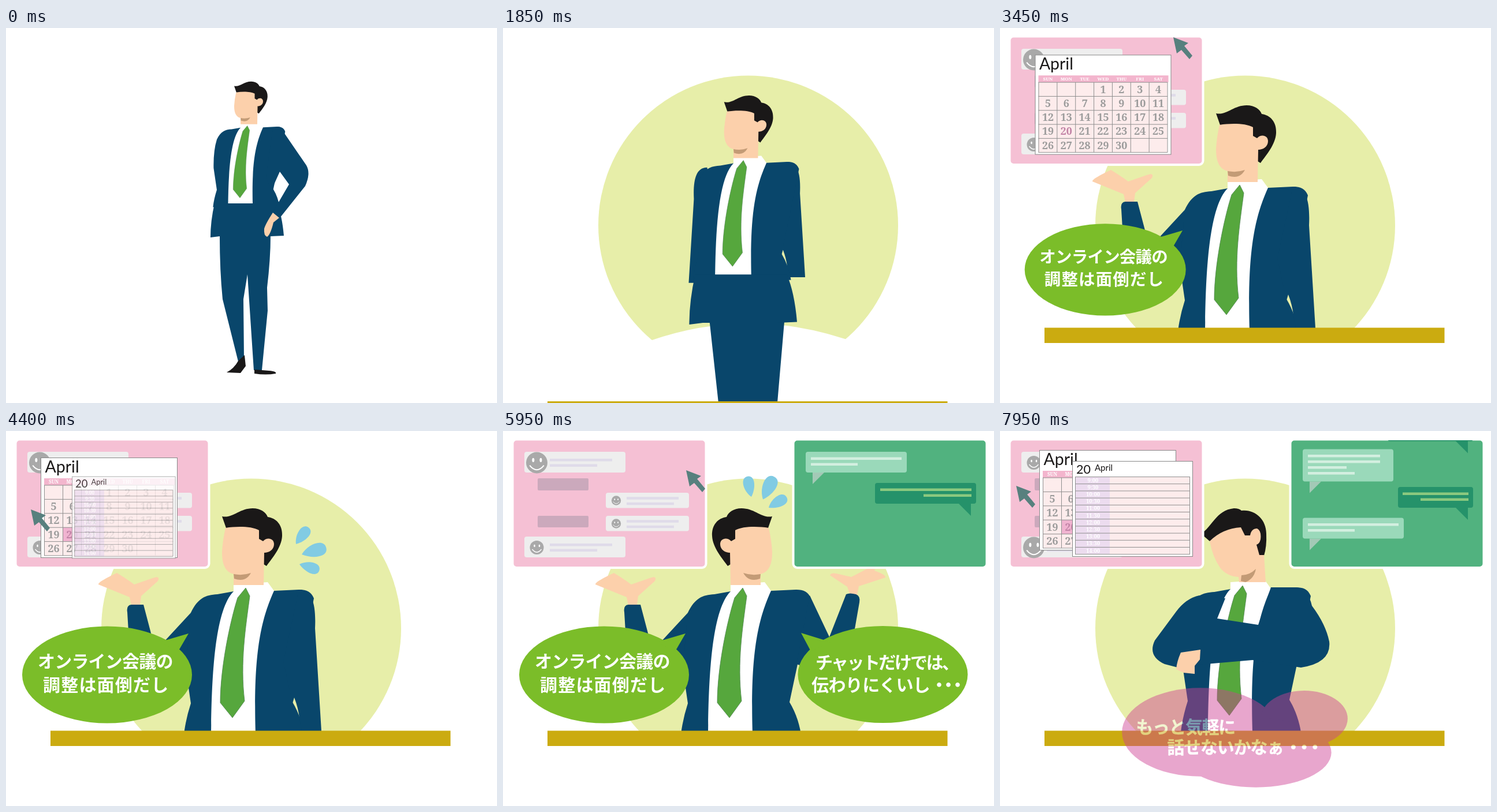
Animation of 850x650 px, one loop 8 s. Source, as an HTML page:

```html
<!DOCTYPE html>
<html lang="ja">
<head>
<meta charset="utf-8">
<style>
  html, body { margin: 0; height: 100%; overflow: hidden; background: #fff; }
  svg { display: block; font-family: "Noto Sans CJK JP", "Noto Sans CJK", sans-serif; }
  .navy { fill: #09466b; } .skin { fill: #fcd0ab; } .hair { fill: #1a1818; }
  .shade { fill: #c39b76; } .white, .talk { fill: #fff; }
  .talk { font-size: 30px; font-weight: 700; }
  .shout { font-size: 42px; font-weight: 900; fill: #fff; stroke: #fff; stroke-width: 1.2; }
  .wish { font-size: 38px; stroke-width: .5; }
  .pink { fill: #cf4093; } .lime { fill: #7bbd29; }
  .latin { font-family: Lato, sans-serif; }
  .num { font-family: "Noto Serif", serif; font-weight: 700; text-anchor: middle; }
</style>
</head>
<body>
<svg width="850" height="650" viewBox="0 0 850 650">
  <defs>
    <clipPath id="chatClip"><rect x="504" y="16" width="332" height="219"/></clipPath>
    <g id="headA">
      <path class="hair" d="M374 148C392 152 404 134 427 134C441 134 450 141 453 149C468 151 479 163 478 182C477 202 461 220 451 234L446 231 430 200V170L381 168Z"/>
      <path class="skin" d="M380 168C400 165 425 165 438 172V187L445 191C452 183 464 186 464 196C464 206 455 211 447 211L446 267H394V248C378 244 374 228 374 210Q375 190 380 168Z"/>
      <path class="shade" d="M394 248Q410 251 424 246Q415 263 395 256Z"/>
    </g>
    <g id="headB">
      <path class="hair" d="M348 178C366 168 374 137 405 134Q414 134 418 138C440 135 461 152 461 178Q462 200 457 216L446 215 430 195 410 185 400 170 363 191Z"/>
      <path class="skin" d="M363 191Q385 169 417 167L424 181H433Q435 169 445 169Q453 173 451 188Q449 196 444 197L449 215H457L460 262H414L413 253Q393 252 381 237Q368 218 363 191Z"/>
      <path class="shade" d="M418 250Q432 250 443 239Q440 256 425 262L417 260Z"/>
    </g>
    <g id="torso">
      <path class="navy" d="M394 278L366 283C345 284 332 290 320 315Q309 350 310 404L320 472Q311 500 308 526H516Q511 495 496 470L510 404 533 290C528 278 520 275 507 275L464 277Z"/>
      <path class="white" d="M394 266L453 262 464 277C440 330 428 390 432 526H355C356 420 362 310 394 278Z"/>
      <path d="M415 272L422 286C415 340 405 400 413 468L392 497 371 471C371 410 388 330 401 289Z" fill="#56a73d" stroke="#4d8350" stroke-width=".8"/>
    </g>
    <path id="hem" class="navy" d="M361 304Q354 335 354 363L370 361H458L481 360Q478 325 469 304Z"/>
    <g id="legs">
      <path class="navy" d="M378 360L403 590H417L422 480 431 593H446L466 360Z"/>
      <path class="hair" d="M380 597Q385 590 417 589V597Q400 599 380 597ZM432 592L455 594Q471 595 470 599Q450 602 432 599Z"/>
    </g>
    <path id="armDown" class="navy" d="M507 275C530 275 537 300 535 342L546 520H512L508 498Q506 480 499 462L496 472 480 400Z"/>
    <g id="armUp">
      <path class="skin" d="M217 302L214 288 160 266Q158 262 192 246Q210 257 222 266L257 254Q267 251 263 260L234 286 232 302Z"/>
      <path class="navy" d="M320 315L259 381 238 301H217Q208 302 210 314L215 398C217 425 228 436 247 430L312 403Z"/>
    </g>
    <path id="drop" fill="#81cbe3" d="M0 0C-12 -12 -14 -36 0 -36C14 -36 11 -14 0 0Z"/>
    <g id="drops">
      <use href="#drop" transform="translate(502 196) rotate(37)"/>
      <use href="#drop" transform="translate(512 214) rotate(74) scale(1.22)"/>
      <use href="#drop" transform="translate(508 231) rotate(107)"/>
    </g>
    <g id="cloudShape" class="pink">
      <ellipse cx="345" cy="361" rx="173" ry="98"/><ellipse cx="575" cy="331" rx="96" ry="62"/>
      <ellipse cx="468" cy="406" rx="167" ry="77"/>
    </g>
  </defs>

  <circle id="disc" cx="424.5" cy="342" r="259.5" fill="#e7eea9"/>
  <path id="ground" class="white"/>

  <g id="man">
    <g id="idle">
      <use href="#torso"/>
      <g transform="translate(-337 -33) scale(1.8)">
        <use href="#hem"/>
        <path class="navy" d="M370 360Q370 420 375 470L402 578 412 570 411 470 418 427 429 593H443L453 490 452 450Q458 400 458 360Z"/>
        <path class="hair" d="M413 567L402 577Q395 590 382 597L406 598 415 586ZM430 592L455 594Q469 595 467 599Q450 602 430 599Z"/>
        <path class="navy" d="M462 174Q478 173 483 184L520 238Q528 252 518 274L475 328 462 319 490 271 474 249 460 280 450 260Z"/>
        <path class="skin" d="M462 320L473 329 463 337Q458 358 452 362Q446 360 447 348Q449 340 462 320Z"/>
      </g>
      <use href="#headA"/>
    </g>
    <g id="puzzled">
      <use href="#torso" x="5"/>
      <g transform="translate(-337 -33) scale(1.8)">
        <use href="#legs"/><use href="#hem"/>
        <path class="navy" d="M384 179Q370 180 338 225Q329 237 331 247L335 266H355L358 250 362 245 367 285 384 250Z"/>
        <path class="navy" d="M445 174H470L497 147 459 132V118L488 120Q520 124 526 140Q529 150 520 162L486 212 464 278 450 250Z"/>
        <path class="skin" d="M459 119L438 112 434 130 459 131Z"/>
      </g>
      <use href="#headB" y="-4"/>
    </g>
    <g id="rest">
      <use href="#armDown"/><use href="#armDown" transform="translate(845 12) scale(-1 1)"/>
      <use href="#torso"/>
      <g transform="translate(-337 -33) scale(1.8)"><use href="#legs"/><use href="#hem"/></g>
      <use href="#headA"/>
    </g>
    <g id="oneUp"><use href="#torso"/><use href="#armDown"/><use href="#armUp"/><use href="#headA"/></g>
    <g id="bothUp">
      <use href="#torso"/><use href="#armUp"/>
      <path class="skin" d="M601 284L596 270 566 250Q568 245 577 247L603 253 632 238Q640 235 645 237L643 242Q663 249 662 254L616 269 613 284Z"/>
      <path class="navy" d="M531 285L565 357 594 283Q600 280 611 283Q619 286 617 297L606 360C602 410 596 432 575 428L508 404Z"/>
      <use href="#headA" transform="translate(840 0) scale(-1 1)"/>
    </g>
    <g id="folded">
      <use href="#torso" x="5" y="-4"/>
      <path class="navy" d="M345 285Q322 290 305 313L268 363Q255 390 285 404L308 410 345 405 437 397 521 410Q574 402 570 365Q564 335 540 303Q533 272 512 271H469L447 336 376 325 390 290Z"/>
      <path class="skin" d="M313 384L347 379 346 396 337 407V421L318 419 305 413Q306 400 313 384Z"/>
      <use href="#headB"/>
    </g>
  </g>

  <g id="desk">
    <rect y="546" width="850" height="260" class="white"/>
    <rect x="77" y="519.5" width="692.5" height="26.5" fill="#cbab10"/>
  </g>

  <g id="pinkPanel">
    <rect x="16.5" y="14.5" width="335" height="222.5" rx="7" fill="#f5c0d4" stroke="#fff" stroke-width="4"/>
    <g id="notes"></g><g id="month"></g><g id="day"></g>
    <path id="cursor" fill="#57807e" d="M0 0L26 10 19 15 33 32 28 38 14 22 6 28Z"/>
  </g>
  <g id="greenPanel">
    <rect x="502.5" y="14.5" width="335" height="222.5" rx="7" fill="#51b27f" stroke="#fff" stroke-width="4"/>
    <g clip-path="url(#chatClip)"><g id="chat"></g></g>
  </g>

  <use id="sweatRight" href="#drops"/>
  <use id="sweatTop" href="#drops" transform="translate(430 114) rotate(-48) translate(-502 -196)"/>

  <g id="talkLeft">
    <ellipse class="lime" cx="175" cy="422.5" rx="147" ry="84"/>
    <path class="lime" d="M316 351L265 366 298 382Z"/>
    <text class="talk" x="55" y="410" letter-spacing="-.8">オンライン会議の</text>
    <text class="talk" x="64" y="451" letter-spacing="1.2">調整は面倒だし</text>
  </g>
  <g id="talkRight">
    <ellipse class="lime" cx="657.5" cy="422" rx="147" ry="84"/>
    <path class="lime" d="M516 350L568 366 533 382Z"/>
    <text class="talk" x="541" y="412" letter-spacing="-2.6">チャットだけでは、</text>
    <text class="talk" x="534" y="451" letter-spacing="-.6">伝わりにくいし<tspan x="740" letter-spacing="-14">・・・</tspan></text>
  </g>

  <ellipse id="puff1" class="pink" cx="458.5" cy="215" rx="18" ry="12"/>
  <ellipse id="puff2" class="pink" cx="493" cy="254" rx="30" ry="21"/>
  <g id="cloud">
    <use href="#cloudShape"/>
    <text class="shout" x="200" y="354" letter-spacing="-3.5">いきなりテレワークって</text>
    <text class="shout" x="235" y="418" letter-spacing="-1.5">言われてもなぁ<tspan x="508" letter-spacing="-15">・・・</tspan></text>
  </g>
  <path id="swirl" fill="none" stroke="#0b2742" stroke-width="1.3" d="M391 39C386 30 400 26 412 28C432 31 441 41 433 46C420 52 398 50 395 46C396 40 436 42 440 50C442 62 406 66 405 59C406 52 428 52 431 57C432 66 415 66 414 78"/>
  <g id="wish">
    <use href="#cloudShape"/>
    <text class="shout wish" x="203" y="364" letter-spacing="-1.5">もっと気軽に</text>
    <text class="shout wish" x="272" y="408" letter-spacing="-1.2">話せないかなぁ<tspan x="532" letter-spacing="-14">・・・</tspan></text>
  </g>
</svg>

<script>
const LOOP = 8000;
const $ = id => document.getElementById(id);
const range = n => [...Array(n).keys()];
const ramp = (t, a, b) => Math.min(1, Math.max(0, (t - a) / (b - a)));
const lerp = (a, b, u) => a + (b - a) * u;
const smooth = u => u * u * (3 - 2 * u);
const back = (u, s = 1.35) => u <= 0 ? 0 : 1 + (s + 1) * (u - 1) ** 3 + s * (u - 1) ** 2;
const pop = (t, start, s) => back(ramp(t, start, start + 240), s);
const shrink = (t, start, s) => back(1 - ramp(t, start, start + 240), s);

const rect = (x, y, w, h, fill, extra = '') =>
  `<rect x="${x}" y="${y}" width="${w}" height="${h}" fill="${fill}" ${extra}/>`;
const text = (x, y, size, cls, fill, s) =>
  `<text class="${cls}" x="${x}" y="${y}" font-size="${size}" fill="${fill}">${s}</text>`;
const line = (x1, y1, x2, y2) => `<path d="M${x1} ${y1}L${x2} ${y2}" stroke="#8f8f8f"/>`;

function show(el, on) { el.style.display = on ? '' : 'none'; }
function scaleAt(el, s, x, y, dx = 0, dy = 0) {
  show(el, s > 0.001);
  el.setAttribute('transform', `translate(${x + dx} ${y + dy}) scale(${s}) translate(${-x} ${-y})`);
}

// Left panel: contact cards, month sheet and day sheet
const face = (x, y, k, id = '') => `<g transform="translate(${x} ${y}) scale(${k})"><g id="${id}">
  <circle r="12" fill="#a9a9a9"/><ellipse cx="-4" cy="-3" rx="1.3" ry="2.3" fill="#fff"/>
  <ellipse cx="4.5" cy="-3" rx="1.3" ry="2.3" fill="#fff"/>
  <path d="M-8 3Q0 13 8 3" fill="none" stroke="#fff" stroke-width="1.3"/></g></g>`;
const card = (x, y, w, h, lineX, lineW, avatar) => rect(x, y, w, h, '#eee', 'rx="4"') +
  rect(lineX, y + h / 2 - 6, lineW, 4.5, '#dfdbe9') + rect(lineX, y + h / 2 + 3.5, lineW * (w > 150 ? .76 : .91), 4.5, '#dfdbe9') + avatar;
const notes = [
  [124, 54, card(37, 36, 175, 36, 81, 108, face(58.5, 55, 1, 'faceTop'))],
  [104, 92, rect(60, 82, 88, 21, '#cba9bc', 'rx="2"')],
  [250, 120, card(178, 107, 144, 26.5, 214, 90, face(196, 120.5, .68))],
  [104, 157, rect(60, 147, 88, 20, '#cba9bc', 'rx="2"')],
  [250, 160, card(178, 147, 144, 26.5, 214, 90, face(196, 160.5, .68))],
  [124, 201, card(37, 183, 175, 36, 81, 108, face(58.5, 202, 1, 'faceBottom'))],
];
$('notes').innerHTML = notes.map(n => `<g>${n[2]}</g>`).join('');

const colX = i => 74.5 + i * 32, rowY = i => 81 + i * 24.4;
$('month').innerHTML = rect(68.5, 33.5, 236, 173, '#fff', 'stroke="#888"') +
  text(75.5, 59, 28.5, 'latin', '#1a1818', 'April') + rect(74, 69, 226, 12, '#f3b5cd') +
  rect(74, 81, 224, 122, '#fdecec') + `<g id="pick">${rect(106.5, 154, 32, 24.4, '#f0b3d0')}</g>` +
  ['SUN', 'MON', 'TUE', 'WED', 'THU', 'FRI', 'SAT'].map((d, i) => text(colX(i) + 16, 78, 8, 'num', '#fff', d)).join('') +
  range(8).map(i => line(colX(i), 81, colX(i), 203)).join('') +
  range(6).map(i => line(74, rowY(i), 298.5, rowY(i))).join('') +
  range(30).map(i => {
    const cell = i + 3;
    return text(colX(cell % 7) + 16, rowY(Math.floor(cell / 7)) + 18.5, 18, 'num', i == 19 ? '#c283a6' : '#9b9b9b', i + 1);
  }).join('');

$('day').innerHTML = rect(125.5, 52.5, 208, 165, '#fff', 'stroke="#888"') +
  text(132, 74, 21.5, 'latin', '#1a1818', '20') + text(164, 69, 15, 'latin', '#1a1818', 'April') +
  rect(130.5, 79.5, 198, 134, '#fdecec') + rect(130.5, 79.5, 59.5, 134, '#ecdcef') +
  range(11).map(i => text(161, 88.5 + i * 12.2, 9.5, 'num', '#fff', `${9 + (i >> 1)}:${i % 2 ? '30' : '00'}`)).join('') +
  range(12).map(i => line(130, 79.5 + i * 12.2, 328.5, 79.5 + i * 12.2)).join('') +
  line(130.5, 79, 130.5, 214) + line(328.5, 79, 328.5, 214);

// Right panel: [start, mine, top, width, line widths]
const messages = [
  [5150, 0, 36, 175, [157, 81]], [5550, 1, 90, 175, [158, 83]],
  [6050, 0, 144, 127, [105, 81]], [6420, 1, 185, 148, [128, 83, 83]],
  [6800, 0, 245, 157, [125, 125, 67, 81]], [7140, 1, 310.5, 130, [114, 83]],
  [7640, 0, 364, 175, [157, 81]],
];
$('chat').innerHTML = messages.map(([, mine, y, w, lines]) => {
  const h = 16 + 10 * lines.length, b = y + h;
  const tail = mine ? `M788 ${b - 1}H810V${b + 21}Z` : `M536 ${b}H556L536 ${b + 20}Z`;
  return `<g><path d="${tail}" fill="${mine ? '#25926a' : '#a3c9b6'}"/>` +
    rect(mine ? 819 - w : 524, y, w, h, mine ? '#25926a' : '#9ad9ba', 'rx="4"') +
    lines.map((l, i) => rect(mine ? 811 - l : 533, y + 9.5 + i * 10, l, 4.5, mine ? '#8bc97f' : '#d3efe0')).join('') + '</g>';
}).join('');

const poses = [['idle', 0], ['puzzled', 350], ['rest', 1700], ['oneUp', 2400], ['bothUp', 4650], ['folded', 7500], ['', LOOP]];
// [time, x, y] stops of the pointer
const pointer = [[3750, 300, 16], [4050, 116, 181], [4200, 116, 181], [4380, 43, 136], [4700, 43, 136],
  [5200, 317, 68], [6750, 317, 68], [7100, 127, 168], [7450, 127, 168], [7800, 28, 95], [LOOP, 28, 95]];

function pointerAt(t) {
  const i = Math.max(1, pointer.findIndex(p => t < p[0]));
  const [a, b] = [pointer[i - 1], pointer[i]], u = smooth(ramp(t, a[0], b[0]));
  return [lerp(a[1], b[1], u), lerp(a[2], b[2], u)];
}

function draw(t) {
  scaleAt($('disc'), 1 - (1 - ramp(t, 100, 400)) ** 3, 424.5, 342);
  const top = lerp(602, 512, ramp(t, 750, 1050));
  $('ground').setAttribute('d', `M128 650V${top + 90}Q428 ${top - 90} 728 ${top + 90}V650Z`);

  poses.slice(0, -1).forEach(([id, from], i) => show($(id), t >= from && t < poses[i + 1][1]));
  const zoom = smooth(ramp(t, 1600, 2050));
  $('man').setAttribute('transform', `translate(${187.2 * (1 - zoom)} ${18.3 * (1 - zoom)}) scale(${lerp(1 / 1.8, 1, zoom)})`);
  $('desk').setAttribute('transform', `translate(0 ${140 * (1 - smooth(ramp(t, 1750, 2300)))})`);

  show($('swirl'), t >= 450 && t < 1250);
  scaleAt($('puff1'), Math.min(pop(t, 450), shrink(t, 1600)), 458, 215);
  scaleAt($('puff2'), Math.min(pop(t, 530), shrink(t, 1550)), 493, 254);
  scaleAt($('cloud'), t < 1200 ? pop(t, 620) : shrink(t, 1500), 421.5, 373);

  scaleAt($('pinkPanel'), pop(t, 2400), 184.5, 126);
  [...$('notes').children].forEach((el, i) => scaleAt(el, pop(t, 2600 + i * 70), notes[i][0], notes[i][1]));
  const swap = ramp(t, 6100, 6220);
  $('faceTop').setAttribute('transform', `scale(${lerp(1.54, 1, swap)})`);
  $('faceBottom').setAttribute('transform', `scale(${lerp(1, 1.54, swap)})`);

  const first = t < 5500, dx = first ? -8 : 0, dy = first ? 13 : 0;
  const fade = first ? 1 - ramp(t, 4650, 4850) : 1;
  scaleAt($('month'), fade && pop(t, first ? 3250 : 6450, 0), 186, 120, dx, dy);
  $('month').style.opacity = fade;
  show($('pick'), first ? t >= 4000 : t >= 7100);
  const dayStart = first ? 4200 : 7400, open = ramp(t, dayStart, dayStart + 250);
  scaleAt($('day'), fade && open && lerp(.28, 1, open), 104, 149, dx, dy);
  $('day').style.opacity = fade * open;
  show($('cursor'), t >= 3250);
  $('cursor').setAttribute('transform', `translate(${pointerAt(t)})`);

  scaleAt($('greenPanel'), pop(t, 4700), 670, 126);
  const scroll = 69 * ramp(t, 6330, 6430) + 76 * ramp(t, 6690, 6790) + 68.5 * ramp(t, 7530, 7640);
  $('chat').setAttribute('transform', `translate(0 ${-scroll})`);
  [...$('chat').children].forEach((el, i) => {
    const [start, mine, y, , lines] = messages[i];
    scaleAt(el, pop(t, start), mine ? 810 : 536, y + 36 + 10 * lines.length);
    el.style.opacity = ramp(t, start, start + 140);
  });

  $('sweatRight').style.opacity = t < 4650 ? ramp(t, 3750, 3950) : 0;
  $('sweatTop').style.opacity = Math.min(ramp(t, 5500, 5700), 1 - ramp(t, 6500, 6650));
  scaleAt($('talkLeft'), t < 5000 ? pop(t, 3300, 0) : shrink(t, 6350), 316, 351);
  scaleAt($('talkRight'), t < 6500 ? pop(t, 5480, 1.2) : shrink(t, 7075), 516, 350);

  const wish = ramp(t, 7800, 8130);
  scaleAt($('wish'), wish && lerp(.6, 1, wish), 421.5, 373, -15, 158.5);
  $('wish').style.opacity = wish;
}

function tick() {
  draw(performance.now() % LOOP);
  requestAnimationFrame(tick);
}
tick();
</script>
</body>
</html>
```
